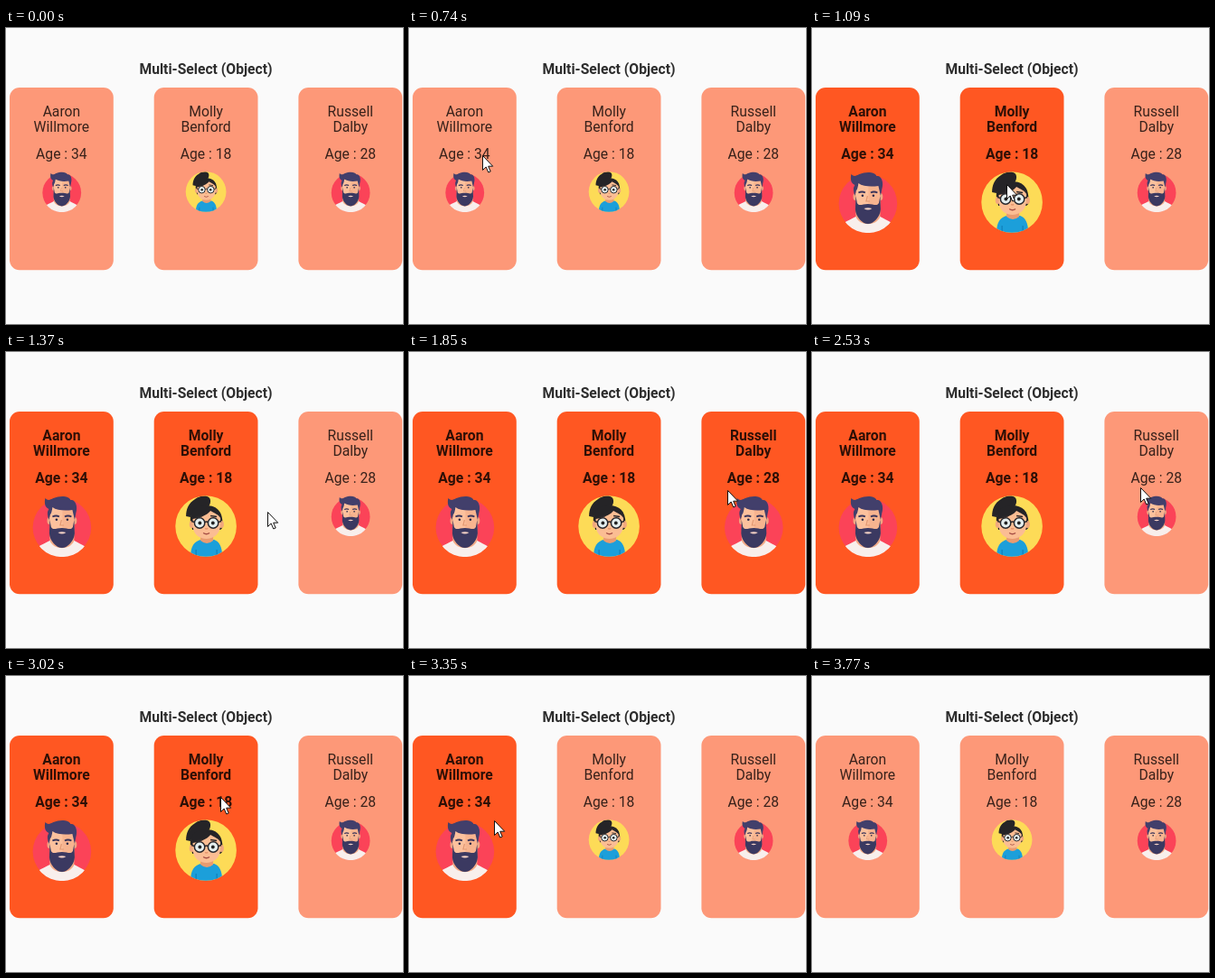
An HTML page for the animation above (4.23 s loop, 439 px wide and 328 px high).

```html
<!DOCTYPE html>
<html lang="en">
<head>
<meta charset="utf-8">
<title>Multi-Select (Object)</title>
<style>
  html, body { margin: 0; width: 100%; height: 100%; overflow: hidden; background: #fafafa; }
  svg { display: block; width: 100%; height: 100%; }
  text { font: 400 15.7px Roboto, Arial, sans-serif; text-anchor: middle; fill: #000; fill-opacity: .78; }
  .bold { font-weight: 700; fill-opacity: .82; }
</style>
</head>
<body>
<svg viewBox="0 0 439 328">
  <defs>
    <clipPath id="manClip"><path d="M0 0H68V36H66.800A32.300 32.300 0 0 1 2.200 36H0Z"/></clipPath>
    <clipPath id="womanClip"><circle cx="34" cy="34" r="33.800"/></clipPath>

    <!-- Avatars are drawn in a 68 x 68 box -->
    <g id="man">
      <circle cx="34.500" cy="35.500" r="32.300" fill="#fb4358"/>
      <g clip-path="url(#manClip)">
        <path d="M0 68C3 57 12 55 21 50L48 50C57 55 65 57 68 68Z" fill="#f8efec"/>
        <path d="M21 38V50C25 61 44 61 48 50V38Z" fill="#f2ab87"/>
        <ellipse cx="20.500" cy="28" rx="2.400" ry="4" fill="#f0a582"/>
        <ellipse cx="48.500" cy="28" rx="2.400" ry="4" fill="#f0a582"/>
        <path d="M21 13H48V36C48 49 21 49 21 36Z" fill="#fcc19d"/>
        <path d="M35 13H48V36C48 41 42 44 35 44Z" fill="#f7b48f"/>
        <path d="M21 27L22.500 35C25 39 28 36 34.500 36C41 36 44 39 46.500 35L48 27L48.500 42C48 50 41 58 34.500 58C28 58 21 50 20.500 42Z" fill="#3b3961"/>
        <path d="M30 41Q34.500 39.500 39 41Q34.500 44 30 41Z" fill="#f6d3c6"/>
        <path d="M20 27C18 21 18 18 20 15C15 13 15 7 16 3C19 6 21 5 25 3C32 0 42 0 44 5C50 4 52 13 50 19L48.500 27L46 16C39 17 29 17 24 13Q23 20 21.500 21Z" fill="#423f6b"/>
        <path d="M24 23.500Q28 21.500 31.500 23.500M45 23.500Q41 21.500 37.500 23.500" stroke="#38345a" stroke-width="1.900" fill="none"/>
        <circle cx="28.500" cy="26.800" r="1.300" fill="#2d2a48"/>
        <circle cx="40.500" cy="26.800" r="1.300" fill="#2d2a48"/>
        <path d="M34 27L32.500 33H36.500" stroke="#e39872" stroke-width="1.200" fill="none"/>
      </g>
    </g>

    <g id="woman">
      <circle cx="34" cy="34" r="33.800" fill="#fddb57"/>
      <g clip-path="url(#womanClip)">
        <path d="M31 13C25 13 20 17 17 24L12 23C12 15 15 8 22 4C28 -1 39 -1 39 6C39 9 38 11 36 13Z" fill="#252427"/>
        <path d="M17 30C15 18 23 11 34 11C47 11 54 19 52 36L50 38H19Z" fill="#252427"/>
        <path d="M17 68C17 56 21 51 28 49H43C49 51 52 57 52 68Z" fill="#1c9fda"/>
        <path d="M28 40V50Q35 56 42 50V40Z" fill="#e99b70"/>
        <ellipse cx="18.500" cy="32" rx="2.800" ry="4" fill="#f1a87c"/>
        <ellipse cx="51" cy="32" rx="2.800" ry="4" fill="#f1a87c"/>
        <path d="M19.500 26C27 25 35 22 39 17C44 20 48 21 50 25V34C49 43 42 48 34.500 48C27 48 20 43 19.500 34Z" fill="#fbbd93"/>
        <path d="M23 23.800L30 22.500M39 22.500L46 23.500" stroke="#2c282b" stroke-width="1.400"/>
        <g fill="#e4eeee" stroke="#27272c" stroke-width="1.500">
          <circle cx="27" cy="30.500" r="5.700"/>
          <circle cx="42" cy="30.500" r="5.700"/>
          <path d="M32.700 29.500Q34.500 28.500 36.300 29.500M21.300 29.500L18 28.500M47.700 29.500L51 28.500" fill="none"/>
        </g>
        <circle cx="27.300" cy="30.500" r="1.900" fill="#222"/>
        <circle cx="41.700" cy="30.500" r="1.900" fill="#222"/>
        <path d="M33 36.500Q34.500 37.500 36 36.500" stroke="#df8a62" stroke-width="1.200" fill="none"/>
        <path d="M31 41.500Q34.500 44 38 41.500" stroke="#a64e45" stroke-width="1.300" fill="none"/>
        <path d="M23 68V60M46 68V60" stroke="#127fb8" stroke-width="1.200"/>
      </g>
    </g>
  </defs>

  <rect width="439" height="328" fill="#fafafa"/>
  <text class="bold" x="221" y="51">Multi-Select (Object)</text>
  <g id="cards"></g>
  <path id="cursor" d="M.5 .5V16.500L4.200 13L6.800 19L9.200 18L6.700 12.200H11.700Z" fill="#fff" stroke="#111" stroke-width="1"/>
</svg>
<script>
  const LOOP = 4230, START = 400, END = 3770, STEPS = 49;
  const LEFT = 4, PITCH = 159.7, WIDTH = 114.8;

  // on / off: the steps at which a card becomes selected and deselected
  const people = [
    { first: "Aaron", last: "Willmore", age: 34, art: "man", on: 6, off: 48 },
    { first: "Molly", last: "Benford", age: 18, art: "woman", on: 10, off: 40 },
    { first: "Russell", last: "Dalby", age: 28, art: "man", on: 19, off: 27 }
  ];

  // Pointer path: [step, x, y]
  const path = [
    [0, 138, 238], [3, 92, 160], [5, 81, 141], [6, 92, 146], [7, 156, 164],
    [9, 208, 172], [11, 222, 174], [13, 262, 176], [14, 289, 177], [15, 318, 172],
    [18, 350, 156], [21, 352, 153], [26, 359, 150], [31, 363, 150], [34, 320, 177],
    [37, 247, 150], [39, 226, 118], [40, 221, 124], [43, 94, 160], [45, 60, 164],
    [47, 68, 170], [48, 222, 275]
  ];

  const cards = document.getElementById("cards");
  const cursor = document.getElementById("cursor");

  cards.innerHTML = people.map((p, i) => {
    const x = LEFT + PITCH * i, mid = x + WIDTH / 2;
    const line = (s, y) => `<text x="${mid}" y="${y}">${s}</text>`;
    return `<g><rect x="${x}" y="66" width="${WIDTH}" height="202.300" rx="11" fill="#ff5722"/>
      ${line(p.first, 97.5)}${line(p.last, 115)}${line("Age : " + p.age, 145)}
      <use href="#${p.art}"/></g>`;
  }).join("");

  people.forEach((p, i) => {
    const g = cards.children[i];
    p.box = g.querySelector("rect");
    p.lines = g.querySelectorAll("text");
    p.avatar = g.querySelector("use");
    p.mid = LEFT + PITCH * i + WIDTH / 2;
  });

  function pointAt(step) {
    const n = path.findIndex(p => p[0] >= step);
    if (n <= 0) return path[0].slice(1);
    const a = path[n - 1], b = path[n];
    const u = (step - a[0]) / (b[0] - a[0]);
    return [a[1] + (b[1] - a[1]) * u, a[2] + (b[2] - a[2]) * u];
  }

  function render(t) {
    // The screen refreshes in discrete steps
    const step = Math.floor((t - START) / (END - START) * STEPS + 0.25);
    for (const p of people) {
      const sel = step >= p.on && step < p.off;
      const size = sel ? 68 : 45;
      p.box.setAttribute("fill-opacity", sel ? 1 : 0.6);
      p.lines.forEach(el => el.setAttribute("class", sel ? "bold" : ""));
      p.avatar.setAttribute("transform", `translate(${p.mid - size / 2} 159) scale(${size / 68})`);
    }
    const shown = step >= 0 && t >= START && step < STEPS;
    cursor.setAttribute("visibility", shown ? "visible" : "hidden");
    if (shown) {
      const [x, y] = pointAt(step);
      cursor.setAttribute("transform", `translate(${Math.round(x)} ${Math.round(y)})`);
    }
  }

  let begin;
  function tick(now) {
    begin ??= now;
    render((now - begin) % LOOP);
    requestAnimationFrame(tick);
  }
  render(0);
  requestAnimationFrame(tick);
</script>
</body>
</html>
```
